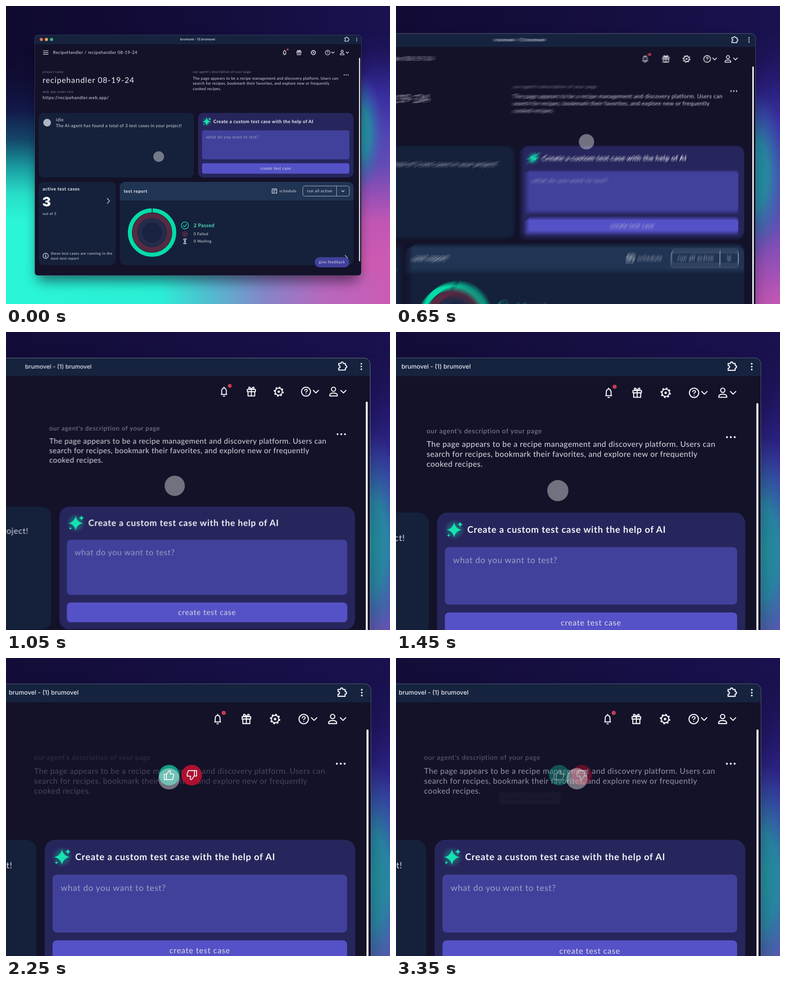
Recreate the animation shown at these times as an HTML page. Size 850 by 659 pixels, loop 3.4 s.

```html
<!DOCTYPE html>
<html lang="en">
<head>
<meta charset="utf-8">
<title>Test dashboard</title>
<style>
  html, body { margin: 0; width: 100%; height: 100%; overflow: hidden; background: #110b30; }
  svg { display: block; width: 850px; height: 659px; }
  text { font-family: Lato, "Open Sans", sans-serif; fill: #dcdce6; text-rendering: geometricPrecision; white-space: pre; }
  .bold { font-weight: 700; fill: #f2f2f8; }
  .dim { fill: #8b8a9c; }
  .bar { font: 500 6.8px Inter, Roboto, sans-serif; fill: #e6e8f0; }
  .count { font: 900 28.5px Inter, Roboto, sans-serif; fill: #fff; }
  .icon { fill: none; stroke: #f0f0f6; stroke-width: 1.2; stroke-linecap: round; stroke-linejoin: round; }
  .panel { fill: #15213b; }
</style>
</head>
<body>
<svg viewBox="0 0 850 659">
  <defs>
    <linearGradient id="top" x1="0" x2="1" y1="0" y2="0">
      <stop offset="0" stop-color="#0f0a2e"/>
      <stop offset=".5" stop-color="#130d3a"/>
      <stop offset="1" stop-color="#1a1250"/>
    </linearGradient>
    <linearGradient id="left" gradientUnits="userSpaceOnUse" x1="0" x2="0" y1="0" y2="659">
      <stop offset=".15" stop-color="#100b32" stop-opacity="0"/>
      <stop offset=".35" stop-color="#13194a"/>
      <stop offset=".45" stop-color="#14486a"/>
      <stop offset=".54" stop-color="#1a9aa0"/>
      <stop offset=".63" stop-color="#27dec8"/>
      <stop offset=".72" stop-color="#2af5d6"/>
    </linearGradient>
    <linearGradient id="right" gradientUnits="userSpaceOnUse" x1="0" x2="0" y1="0" y2="659">
      <stop offset=".07" stop-color="#1a1250" stop-opacity="0"/>
      <stop offset=".2" stop-color="#241b70"/>
      <stop offset=".3" stop-color="#392e9f"/>
      <stop offset=".43" stop-color="#5045b4"/>
      <stop offset=".54" stop-color="#654cb4"/>
      <stop offset=".63" stop-color="#9350b6"/>
      <stop offset=".72" stop-color="#c056b4"/>
      <stop offset=".85" stop-color="#cc5ab2"/>
    </linearGradient>
    <linearGradient id="bottom" x1="0" x2="1" y1="0" y2="0">
      <stop offset="0" stop-color="#2af5d6"/>
      <stop offset=".4" stop-color="#2aefd6"/>
      <stop offset=".54" stop-color="#55b8d0"/>
      <stop offset=".68" stop-color="#8784c8"/>
      <stop offset=".82" stop-color="#b569bf"/>
      <stop offset="1" stop-color="#cc5ab2"/>
    </linearGradient>
    <radialGradient id="teal">
      <stop offset="0" stop-color="#2296a0"/>
      <stop offset=".4" stop-color="#268ea4" stop-opacity=".9"/>
      <stop offset="1" stop-color="#3a60b0" stop-opacity="0"/>
    </radialGradient>
    <radialGradient id="glow">
      <stop offset="0" stop-color="#14e0ae" stop-opacity=".5"/>
      <stop offset="1" stop-color="#14e0ae" stop-opacity="0"/>
    </radialGradient>
    <filter id="soft" x="-20%" y="-20%" width="140%" height="150%"><feGaussianBlur stdDeviation="14"/></filter>
    <path id="down" d="M-3-1.5 0 1.5 3-1.5"/>
    <path id="star" d="M0-1Q.16-.16 1 0 .16.16 0 1-.16.16-1 0-.16-.16 0-1Z"/>
    <path id="thumb" d="M-5.4-1h2.4v6h-2.4zM-3-.6 0-4.9Q1.9-5.2 1.6-3.2L1.2-1.2H4.9L5.2.6 3.7 5H-3"/>

    <g id="backdrop">
      <rect width="850" height="659" fill="url(#top)"/>
      <rect width="400" height="659" fill="url(#left)"/>
      <rect x="400" width="450" height="659" fill="url(#right)"/>
      <rect width="850" height="64" fill="url(#top)"/>
      <rect y="590" width="850" height="69" fill="url(#bottom)"/>
      <ellipse cx="786" cy="280" rx="50" ry="130" fill="url(#teal)"/>
      <rect x="70" y="84" width="710" height="524" rx="10" fill="#070518" opacity=".55" filter="url(#soft)"/>
    </g>

    <g id="window">
      <rect x="63.5" y="64" width="723" height="532" rx="7" fill="#131229"/>
      <path d="M63.5 84.5V71a7 7 0 0 1 7-7h709a7 7 0 0 1 7 7v13.5z" fill="#16233f"/>
      <rect x="63.5" y="64" width="723" height="532" rx="7" fill="none" stroke="#fff" stroke-opacity=".3" stroke-width=".5"/>
      <circle cx="78.3" cy="74" r="3.6" fill="#ec6a5e"/>
      <circle cx="89.5" cy="74" r="3.6" fill="#e0a35c"/>
      <circle cx="100.8" cy="74" r="3.6" fill="#3fae74"/>
      <text class="bar" x="385.5" y="76.2">brumovel - (1) brumovel</text>
      <path class="icon" d="M750 70.3h2.6q.2-1.7 1.4-1.7t1.4 1.7h2.4v2.2q1.6.1 1.6 1.5t-1.6 1.5v2.4h-7.8v-2.3q1.6-.2 1.6-1.6t-1.6-1.5z"/>
      <g fill="#f0f0f6"><circle cx="776.3" cy="70.6" r=".95"/><circle cx="776.3" cy="73.8" r=".95"/><circle cx="776.3" cy="77" r=".95"/></g>

      <path class="icon" d="M82.5 99h11M82.5 102.8h11M82.5 106.6h11"/>
      <text x="104" y="105.8" font-size="9.6" letter-spacing=".43">RecipeHandler / recipehandler 08-19-24</text>

      <g class="icon">
        <path d="M613.4 106.2h6.6M614 106v-3.6q.2-3.4 2.7-3.6 2.5.2 2.7 3.6v3.6M616.7 98.4v-.6M616 108.2h1.4"/>
        <path d="M643.8 100.4h9.4v2.6h-9.4zM644.6 103v5h7.8v-5M648.5 100.4V108M648.5 100.2q-3.6 0-3-2 .8-1.6 3 2 2.2-3.6 3-2 .6 2-3 2"/>
        <circle cx="680.3" cy="103" r="4.1"/>
        <circle cx="680.3" cy="103" r="5" stroke-width="1.6" stroke-dasharray="1.96" stroke-linecap="butt"/>
        <circle cx="680.3" cy="103" r=".8"/>
        <circle cx="712" cy="103" r="5.2"/>
        <path d="M710.4 101.8q.1-1.5 1.6-1.5 1.6.1 1.6 1.4 0 .9-1.6 1.6v.5M712 105.6v.1" stroke-width="1"/>
        <use href="#down" x="723.5" y="103"/>
        <circle cx="744" cy="100.2" r="2.4"/>
        <path d="M739.6 108v-1.2q.4-2.2 4.4-2.2t4.4 2.2v1.2z"/>
        <use href="#down" x="755.5" y="103"/>
      </g>
      <circle cx="623.4" cy="96.2" r="2.3" fill="#c93b55"/>
      <rect x="781.5" y="114.5" width="2.2" height="450" rx="1.1" fill="#fff"/>

      <text class="dim" x="81" y="148" font-size="6.9" letter-spacing=".6">project name</text>
      <text x="81" y="170" font-size="17.2" letter-spacing="1.1" style="fill:#f0f0f6">recipehandler 08-19-24</text>
      <text class="dim" x="81" y="191.5" font-size="6.9" letter-spacing=".57">web app under test</text>
      <text x="81" y="206" font-size="9.8" letter-spacing=".5">https://recipehandler.web.app/</text>

      <g id="about">
        <text class="dim" x="413.6" y="148" font-size="7.3" letter-spacing=".41">our agent's description of your page</text>
        <g font-size="8.7" letter-spacing=".255">
          <text x="413.6" y="163.4">The page appears to be a recipe management and discovery platform. Users can</text>
          <text x="413.6" y="174.4">search for recipes, bookmark their favorites, and explore new or frequently</text>
          <text x="413.6" y="185.5">cooked recipes.</text>
        </g>
      </g>
      <g fill="#f0f0f6"><circle cx="748.7" cy="152.4" r="1.1"/><circle cx="753" cy="152.4" r="1.1"/><circle cx="757.3" cy="152.4" r="1.1"/></g>

      <rect class="panel" x="72" y="236.5" width="344" height="142.5" rx="11.5"/>
      <circle cx="91" cy="258" r="8.5" fill="#aeb5c4"/>
      <text x="110.5" y="255" font-size="9.8" letter-spacing=".5">idle</text>
      <text x="110.5" y="268" font-size="9.6" letter-spacing=".37">The AI-agent has found a total of 3 test cases in your project!</text>

      <rect x="425.3" y="236.5" width="343.7" height="142.5" rx="11.5" fill="#27265c"/>
      <circle cx="444.5" cy="255.5" r="11.5" fill="url(#glow)"/>
      <g fill="#16e2b0">
        <use href="#star" transform="translate(444.3 255.7) scale(8.6)"/>
        <use href="#star" transform="translate(451 249.7) scale(3.2)"/>
        <use href="#star" transform="translate(438.2 261.8) scale(1.8)"/>
      </g>
      <text class="bold" x="459" y="259" font-size="10.2" letter-spacing=".44">Create a custom test case with the help of AI</text>
      <rect x="434" y="275" width="326" height="64" rx="4.5" fill="#41419c"/>
      <text x="443.1" y="293" font-size="9.4" letter-spacing=".38" style="fill:#a09fc8">what do you want to test?</text>
      <rect x="434" y="347.8" width="326" height="23" rx="4.5" fill="#5552c8"/>
      <text x="563.3" y="362.3" font-size="8.8" letter-spacing=".45">create test case</text>

      <rect class="panel" x="72" y="389" width="171" height="184" rx="11.5"/>
      <text class="bold" x="81" y="407.5" font-size="10" letter-spacing=".57">active test cases</text>
      <text class="count" x="80.3" y="442.5">3</text>
      <text x="81" y="461.5" font-size="8" letter-spacing=".35">out of 3</text>
      <path class="icon" d="M224 425.5l5.2 5.7-5.2 5.7" stroke-width="1.5"/>
      <circle class="icon" cx="87.8" cy="552.5" r="5.8"/>
      <path class="icon" d="M87 551.4h1v3.6M86.6 555h2.6M87.8 549.4v.1" stroke-width="1"/>
      <g font-size="8.2" letter-spacing=".41">
        <text x="99" y="550">these test cases are running in the</text>
        <text x="99" y="561">next test report</text>
      </g>

      <rect class="panel" x="252" y="389" width="517" height="184" rx="11.5"/>
      <path d="M252 430v-29.5a11.5 11.5 0 0 1 11.5-11.5h494a11.5 11.5 0 0 1 11.5 11.5V430z" fill="#203453"/>
      <text class="bold" x="260.7" y="412.5" font-size="9.8" letter-spacing=".55">test report</text>
      <path class="icon" d="M589 404.8h10.4v9h-10.4zM591.8 408.2h5M591.8 411h3M592 403.8v1M596.4 403.8v1" stroke-width="1"/>
      <g font-size="8.8" letter-spacing=".5">
        <text x="605" y="412">schedule</text>
        <text x="666.5" y="412">run all active</text>
      </g>
      <rect x="657" y="398" width="103" height="22.5" rx="4.5" fill="none" stroke="#c4cad8" stroke-width=".9"/>
      <path d="M731.7 398v22.5" stroke="#c4cad8" stroke-width=".9"/>
      <use class="icon" href="#down" x="745.8" y="409.3"/>

      <g fill="none">
        <circle cx="323.3" cy="501" r="49" stroke="#06dba8" stroke-width="9" stroke-dasharray="305.4 2.5" transform="rotate(-88.5 323.3 501)"/>
        <circle cx="323.3" cy="501" r="38" stroke="#572a42" stroke-width="11"/>
        <circle cx="323.3" cy="501" r="27" stroke="#232c4a" stroke-width="10"/>
      </g>
      <circle cx="323.3" cy="501" r="21.5" fill="#19233f"/>
      <g class="icon">
        <path d="M392.4 485.4l2.7 2.8 4.8-5.6" stroke="#14dcae" stroke-width="1.5"/>
        <circle cx="396" cy="485.2" r="7.8" stroke="#14dcae" stroke-width="1.5"/>
        <circle cx="396" cy="504.3" r="5" stroke="#c13a52" stroke-width="1"/>
        <path d="M394 502.3l4 4M398 502.3l-4 4" stroke="#c13a52" stroke-width="1"/>
        <path d="M392.8 515.2h6.4M392.8 525.6h6.4M394 515.4q0 3.4 2 5-2 1.6-2 5h4q0-3.4-2-5 2-1.6 2-5"/>
      </g>
      <text x="415.3" y="489" font-size="11" font-weight="700" letter-spacing=".37" style="fill:#4fe0bd">2 Passed</text>
      <g font-size="8.6" letter-spacing=".4">
        <text x="415.3" y="507.3">0 Failed</text>
        <text x="415.3" y="523.4">0 Waiting</text>
      </g>
      <path class="icon" d="M750.6 551.4l5.4 5.7-5.4 5.7" stroke-width="1.4"/>
      <rect x="683.5" y="555.5" width="76.5" height="22.5" rx="11.2" fill="#41409c"/>
      <text x="692.5" y="569.2" font-size="8.6" letter-spacing=".48">give feedback</text>

      <g id="votes" opacity="0">
        <circle cx="563" cy="165" r="11.4" fill="#139a84"/>
        <circle cx="588" cy="165" r="11.4" fill="#b0102f"/>
        <use class="icon" href="#thumb" x="563" y="165" style="stroke-width:1"/>
        <use class="icon" href="#thumb" transform="translate(588 165) rotate(180)" style="stroke-width:1"/>
      </g>
      <g id="tip" opacity="0">
        <path d="M559 184.2l4-4.2 4 4.2z" fill="#fff"/>
        <rect x="487.5" y="184" width="86.5" height="21" rx="4" fill="#fff"/>
        <text x="496.5" y="198" font-size="8.8" letter-spacing=".22" style="fill:#24234a">great description</text>
      </g>
    </g>
  </defs>
  <use id="back" href="#backdrop"/>
  <g id="layers"></g>
</svg>
<script>
  const LOOP = 3400, STEP = 50, SHUTTER = 14, SAMPLES = 8;
  const FOCUS = { x: 765, y: 71 };
  const NS = 'http://www.w3.org/2000/svg';
  const $ = id => document.getElementById(id);
  const set = (el, attrs) => { for (const k in attrs) el.setAttribute(k, attrs[k]); return el; };
  const make = (tag, parent, attrs) => set(parent.appendChild(document.createElementNS(NS, tag)), attrs);

  // Stacked layers with falling opacity average into motion blur.
  const layers = Array.from({ length: SAMPLES }, (_, i) => {
    const g = make('g', $('layers'), { opacity: 1 / (i + 1) });
    make('use', g, { href: '#window' });
    return { g, dot: make('circle', g, { r: 11.8, fill: '#fff', 'fill-opacity': .4 }) };
  });

  const ramp = (t, start, length) => {
    const p = Math.min(1, Math.max(0, (t - start) / length));
    return p * p * (3 - 2 * p);
  };

  // Overdamped spring for the camera.
  function zoom(t) {
    const s = Math.max(0, t - 455) / 1000, a = 4.5, b = 16;
    return 2 - (b * Math.exp(-a * s) - a * Math.exp(-b * s)) / (b - a);
  }

  // Critically damped spring for each pointer move.
  function glide(t, start) {
    const k = 12 * Math.max(0, t - start) / 1000;
    return 1 - (1 + k) * Math.exp(-k);
  }
  const moves = [[370, 222, -121], [1825, 3, -44.5], [3060, 23, 1.7]];
  const pointer = t => moves.reduce(([x, y], [start, dx, dy]) => {
    const p = glide(t, start);
    return [x + dx * p, y + dy * p];
  }, [338, 333]);

  const camera = s => `translate(${FOCUS.x} ${FOCUS.y}) scale(${s}) translate(${-FOCUS.x} ${-FOCUS.y})`;

  function draw(t) {
    const hover = ramp(t, 1970, 300) - ramp(t, 3200, 290);
    const tip = ramp(t, 2250, 220) - ramp(t, 3140, 280);
    set($('about'), { opacity: 1 - .75 * hover });
    set($('votes'), { opacity: hover });
    const grow = .75 + .25 * tip;
    set($('tip'), {
      opacity: tip * tip,
      transform: `translate(530.75 184) scale(${grow} ${grow * grow}) translate(-530.75 -184)`
    });

    set($('back'), { transform: camera(zoom(t)) });
    const [x0, y0] = pointer(t - SHUTTER / 2), [x1, y1] = pointer(t + SHUTTER / 2);
    const drift = Math.hypot(x1 - x0, y1 - y0) + 700 * (zoom(t + SHUTTER / 2) - zoom(t - SHUTTER / 2));
    const blurred = drift > .8;
    layers.forEach(({ g, dot }, i) => {
      g.style.display = i && !blurred ? 'none' : '';
      const at = blurred ? t + SHUTTER * (i / (SAMPLES - 1) - .5) : t;
      const [cx, cy] = pointer(at);
      set(g, { transform: camera(zoom(at)) });
      set(dot, { cx, cy });
    });
  }

  let last = -1;
  function tick() {
    const t = Math.floor(performance.now() % LOOP / STEP) * STEP;
    if (t !== last) draw(last = t);
    requestAnimationFrame(tick);
  }
  tick();
</script>
</body>
</html>
```
